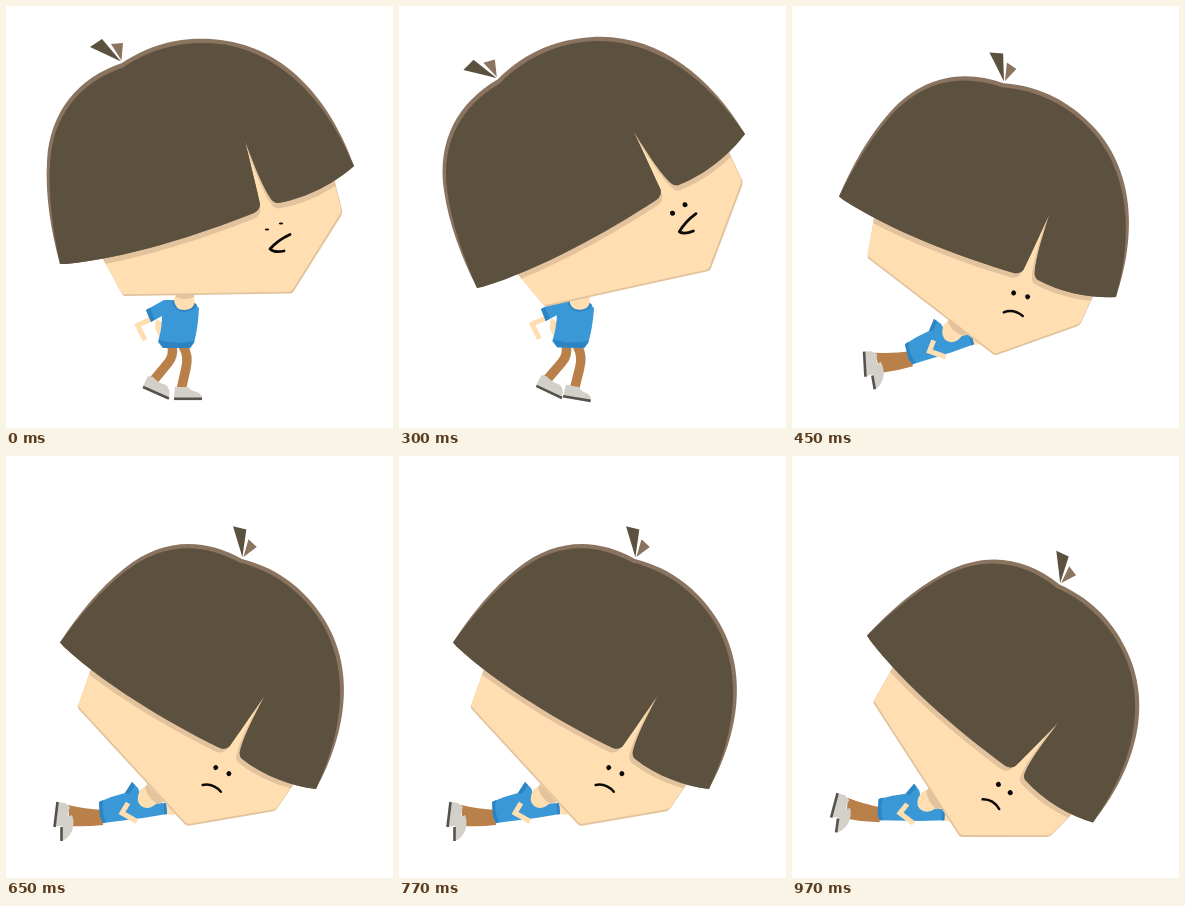
Animation, 387 px wide and 422 px high, one loop 1.05 s. Source, as an HTML page:

```html
<!DOCTYPE html>
<html lang="en">
<head>
<meta charset="utf-8">
<title>Bobbing boy</title>
<style>
  html, body { margin: 0; width: 100%; height: 100%; overflow: hidden; background: #fff; }
  svg { display: block; width: 100vw; height: 100vh; }
  .hair { fill: #5c513f; }
  .rim { fill: #8a7460; }
  .skin { fill: #ffdfb1; }
  .shade { fill: #e2c39d; }
  .shirt { fill: #3a98d7; }
  .cuff { fill: #2d84c3; }
  .pants { fill: #b98049; }
  .shoe { fill: #d2d0c8; }
  .arm { fill: none; stroke: #ffdfb1; stroke-width: 5; }
  .leg { fill: none; stroke: #b98049; stroke-width: 9.5; stroke-linejoin: round; }
  .sole { fill: none; stroke: #55524d; stroke-width: 2.6; }
  .ink { fill: none; stroke: #0c0a08; stroke-linecap: round; stroke-linejoin: round; }
</style>
</head>
<body>
<svg viewBox="0 0 387 422" preserveAspectRatio="none">
  <defs>
    <path id="face" d="M90 236 L97 253 L116 288 Q117 290 119 290 L284 287.5 Q287 287 288 285 L335 210 Q336.500 207 336 204 L328 172 L250 120 Z"/>
    <path id="hair" d="M54 258 C45 225 39 190 41 155 C44 105 72 72 116 57 C150 34 185 30 215 34 C280 42 325 95 348 160
      C330 176 302 192 272 197 Q268 197 265 193 C255 178 248 158 239 135 C245 160 250 180 254 198 Q254 204 248 207 C190 230 120 252 60 258 Z"/>
    <clipPath id="faceClip"><use href="#face"/></clipPath>
  </defs>

  <g id="standing">
    <path class="arm" d="M145 313 L131.500 319.500 L139 334"/>
    <path class="skin" d="M150 313 L156 316 L153.500 332 L149 322 Z"/>
    <path class="leg" d="M166 340 Q168 350 162 357 L148 374"/>
    <path class="leg" d="M177 340 Q183 350 180 362 L175.500 382"/>
    <path class="shoe" d="M142 370 L147 371 Q152 377 160 379 Q165 383 163 391 L137 380 Z"/>
    <path class="sole" d="M137 381 L163 392.500"/>
    <g id="frontShoe">
      <path class="shoe" d="M169 381 H182 Q185 385 191 386 Q196 388 196 392 H168 Z"/>
      <path class="sole" d="M168 392.800 H196"/>
    </g>
    <path class="shirt" d="M158 294 L168 294 L189 298 L193 302 Q192 322 188 337 L184 342 H157 L152 336 Q156 322 156 310 L145 316 L140 304 Z"/>
    <path class="cuff" d="M140 304 L144 302 L149 313.500 L145 316 Z M152.500 334 Q170 339 188.500 335 L184 342 H157 Z
      M166 295 Q168 305 178 306 Q188 305 191 299 L189 297 Z"/>
    <path class="skin" d="M168 294 Q169 304 178 304 Q187 304 188.500 297 L188 286 H170 Z"/>
    <path class="shade" d="M170 286 H188 V291 Q179 295 170 291 Z"/>
  </g>

  <g id="lying">
    <path class="pants" d="M62 349 Q78 353 98 354 L97 369 Q80 371 64 370 Z"/>
    <path class="shoe" d="M52 346 L59 347 L64 351 L62 357 Q62 363 65 368 L49 371 Z"/>
    <path class="sole" d="M51.500 346 L48.500 371"/>
    <path class="shoe" d="M56 364 L66 359 Q69 366 66 375 Q62 383 56 385 Z"/>
    <path class="sole" d="M55.500 371 L55.500 385"/>
    <path class="skin" d="M158 349 L172 353 L168 359 L158 358 Z"/>
    <path class="shirt" d="M93 346 Q106 340 119 337 L126 326 L132 332 L138 348 L160 347 L161 358 L137 362 L97 367 L94 361 Z"/>
    <path class="cuff" d="M93 346 L97 344 Q95 355 100 366.500 L97 367 L94 361 Z M158 347 H160 L161 358 L158 358.500 Z
      M119 337 L126 326 L129 329 L123 338 Z"/>
    <path class="skin" d="M134 334 Q129 345 135 350 Q142 355 150 348 L160 338 L145 326 Z"/>
    <path class="shade" d="M141 328 L158 346 L152 348 Q143 344 139 332 Z"/>
    <path class="arm" d="M122 347 L116 357 L131 365.500"/>
  </g>

  <g id="head">
    <path class="hair" d="M84 41 L96 33 L115 55.500 Z"/>
    <path class="rim" d="M105 38 L117 37 L115.500 54.500 Z"/>
    <use href="#face" class="shade"/>
    <g clip-path="url(#faceClip)">
      <use href="#face" class="skin" transform="translate(-1.200 -1.800)"/>
      <use href="#hair" class="shade" transform="translate(.5 5.500)"/>
    </g>
    <use href="#hair" class="rim"/>
    <path class="hair" d="M54 258 C47 225 42 190 44 157 C47 109 74 76 117 61.500 C150 39 185 34.500 214 38 C276 46 321 96 348 160
      C330 176 302 192 272 197 Q268 197 265 193 C255 178 248 158 239 135 C245 160 250 180 254 198 Q254 204 248 207 C190 230 120 252 60 258 Z"/>
    <ellipse class="eye" cx="261" cy="223.500" fill="#0c0a08"/>
    <ellipse class="eye" cx="275" cy="217.500" fill="#0c0a08"/>
    <path id="pout" class="ink" stroke-width="2.800" d="M284 228.500 Q272 234 264 243 Q268 247 278 245"/>
    <path id="frown" class="ink" stroke-width="2.600" d="M265.500 246 Q271 236.500 283.500 236.500"/>
  </g>
</svg>
<script>
const $ = id => document.getElementById(id);
const LOOP = 1050;

// Hair corners at rest; each pose places the head by these two points.
const REST = [54, 258, 348, 160];
const poses = [
  { at: 0,   hair: REST,                 eye: [2.2, 1],   body: "" },
  { at: 150, hair: [71, 277, 346, 136],  eye: [2.1, 1.8], body: "translate(0 .5) rotate(.7 165 393)", shoe: "translate(-3 0) rotate(6 182 392)" },
  { at: 300, hair: [78, 282, 346, 128],  eye: [2.5, 2.5], body: "translate(0 -.5) rotate(1.300 165 393)", shoe: "translate(-4 0) rotate(8 182 392)" },
  { at: 450, hair: [47, 190.5, 324, 291], eye: [2.6, 2.6], body: "translate(22 -8) rotate(-10 94 358)", lying: true },
  { at: 650, hair: [54, 186.5, 310, 333], eye: [2.6, 2.6], body: "", lying: true },
  { at: 850, hair: [75, 179.5, 301, 366.5], eye: [2.6, 2.6], body: "translate(-8 -3) rotate(8 94 358)", lying: true }
];

// Rotation, scale and shift that carry the rest corners onto the given ones.
function headMatrix([x1, y1, x2, y2]) {
  const [l, t, r, b] = REST;
  const w = r - l, h = b - t, u = x2 - x1, v = y2 - y1;
  const n = w * w + h * h;
  const c = (u * w + v * h) / n, s = (v * w - u * h) / n;
  return `matrix(${c} ${s} ${-s} ${c} ${x1 - c * l + s * t} ${y1 - s * l - c * t})`;
}

const show = (id, on) => $(id).setAttribute("display", on ? "inline" : "none");

function setPose(p) {
  $("head").setAttribute("transform", headMatrix(p.hair));
  $(p.lying ? "lying" : "standing").setAttribute("transform", p.body);
  $("frontShoe").setAttribute("transform", p.shoe || "");
  show("lying", p.lying);
  show("frown", p.lying);
  show("standing", !p.lying);
  show("pout", !p.lying);
  for (const e of document.querySelectorAll(".eye")) {
    e.setAttribute("rx", p.eye[0]);
    e.setAttribute("ry", p.eye[1]);
  }
}

const start = performance.now();
let current;
function tick() {
  const t = (performance.now() - start) % LOOP;
  const pose = poses.findLast(p => p.at <= t) || poses[0];
  if (pose !== current) setPose(current = pose);
  requestAnimationFrame(tick);
}
tick();
</script>
</body>
</html>
```
